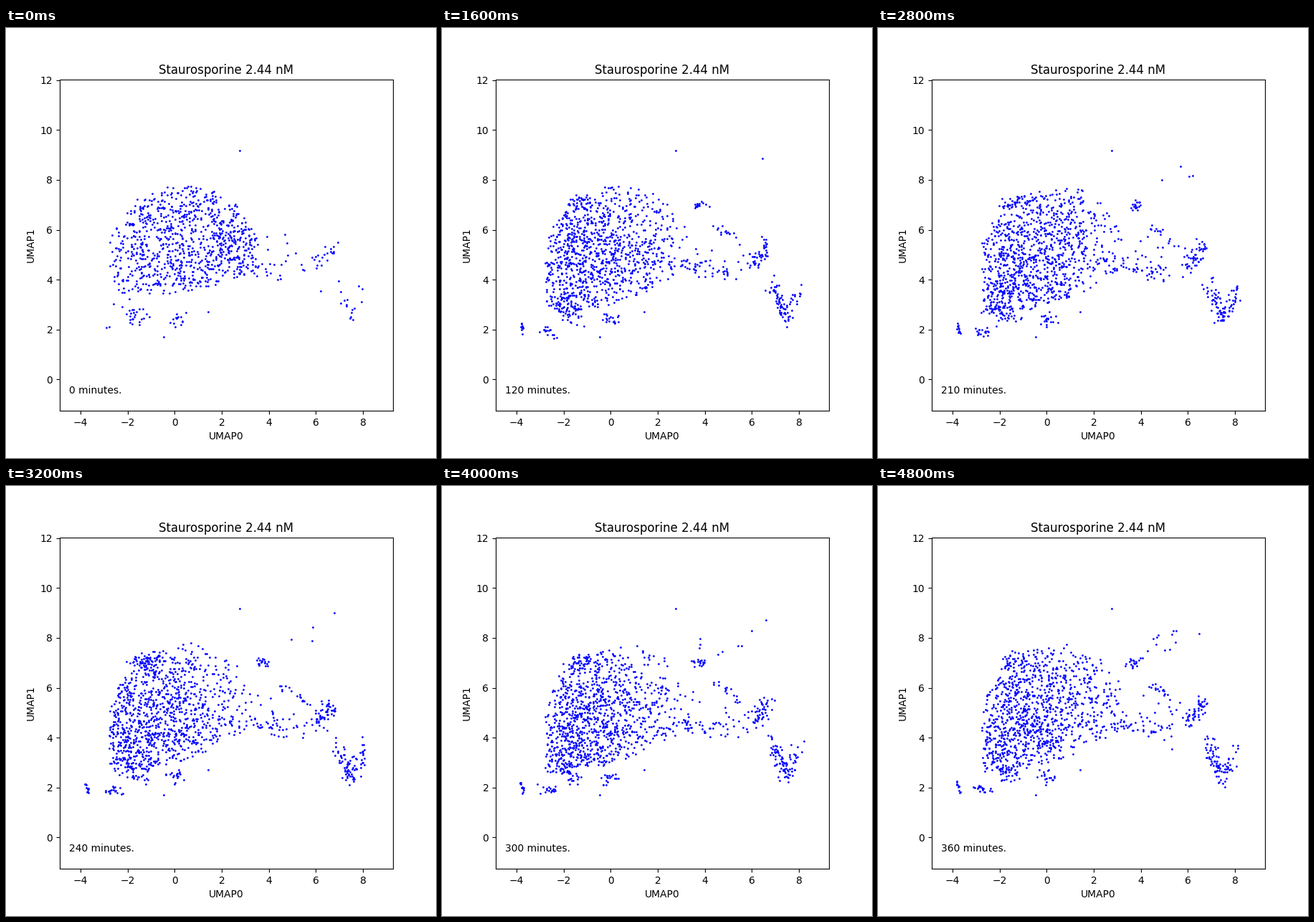
Animation of 600x600 px, one loop 5200 ms. Source, as a matplotlib script:

```python
import numpy as np
import matplotlib.pyplot as plt
from matplotlib.animation import FuncAnimation

STEPS = 13   # one step every 30 minutes

# Small groups: key points of a path, spread (x, y), count at start and end
GROUPS = [
    ([(-3.82, 2.25), (-3.7, 1.8)], (.03, .06), 0, 11),
    ([(-3.0, 1.95), (-2.3, 1.85)], (.1, .1), 2, 17),
    ([(-2.2, 3.0), (-1.8, 2.5), (-1.3, 2.5)], (.22, .18), 26, 38),
    ([(-.1, 2.4), (.2, 2.4)], (.18, .15), 15, 18),
    ([(-1.7, 6.95), (-1.0, 7.2)], (.22, .16), 6, 36),
    ([(6.8, 3.8), (7.2, 3.1), (7.45, 2.4), (8.05, 3.6)], (.12, .25), 16, 85),
    ([(5.9, 4.6), (6.35, 4.9), (6.65, 5.4)], (.16, .2), 18, 50),
    ([(2.8, 4.6), (4.0, 4.45), (5.2, 4.3)], (.25, .18), 18, 42),
    ([(3.5, 7.0), (4.0, 7.0)], (.1, .1), 0, 18),
    ([(4.4, 6.15), (5.0, 5.85), (5.8, 5.2)], (.09, .09), 0, 17),
    ([(2.9, 5.9), (4.2, 5.0), (6.0, 4.4)], (.5, .55), 16, 14),
]
FIXED = [(2.77, 9.18), (-.48, 1.7), (1.43, 2.7)]


def mix(a, b, t):
    return a + (b - a) * t


def body(rng, hour, settled):
    """Main cloud: wide at first, then leaning left with a thin right side."""
    n = int(mix(880, 1010, settled))
    x = -2.8 + 6.4 * rng.beta(1.5, mix(1.4, 2.8, settled) - .05 * hour, n)
    top = 4.6 + 3.2 * np.sqrt(1 - ((x - .4) / 3.3) ** 2)
    low = 2.95 + .27 * x + .05 * x**2 + (.5 - .17 * x) * (1 - settled)
    y = mix(low, top, rng.beta(1.3, 1.3 + .06 * hour, n))
    return np.column_stack([x, y])


def group(rng, settled, path, spread, start, end):
    n = round(mix(start, end, settled))
    path = np.array(path)
    t = rng.random(n) * (len(path) - 1)
    pts = [np.interp(t, np.arange(len(path)), axis) for axis in path.T]
    noise = np.clip(rng.normal(size=(n, 2)), -2, 2)
    return np.column_stack(pts) + noise * spread


def strays(rng, hour):
    """Lone cells that gather above the right side."""
    n = int(13 * (hour / 6) ** 2)
    x = rng.uniform(3.7, 6.8, n)
    y = 7.2 + .35 * (x - 3.7) + rng.uniform(-.2, .8, n)
    return np.column_stack([x, y])


def cells(step):
    rng = np.random.default_rng(40 + step)
    hour = step / 2
    settled = 1 - np.exp(-hour)
    parts = [FIXED, body(rng, hour, settled), strays(rng, hour)]
    parts += [group(rng, settled, *g) for g in GROUPS]
    return np.vstack(parts)


fig, ax = plt.subplots(figsize=(6, 6), dpi=100)
ax.set(xlim=(-4.89, 9.28), ylim=(-1.25, 12.02), xlabel="UMAP0", ylabel="UMAP1")
ax.set_title("Staurosporine 2.44 nM")
dots, = ax.plot([], [], ".", color="blue", markersize=2)
label = ax.text(-4.5, -.57, "")


def draw(step):
    dots.set_data(*cells(step).T)
    label.set_text(f"{step * 30} minutes.")
    return dots, label


anim = FuncAnimation(fig, draw, frames=STEPS, init_func=lambda: draw(0),
                     interval=400, repeat=True, repeat_delay=0)
plt.show()
```
